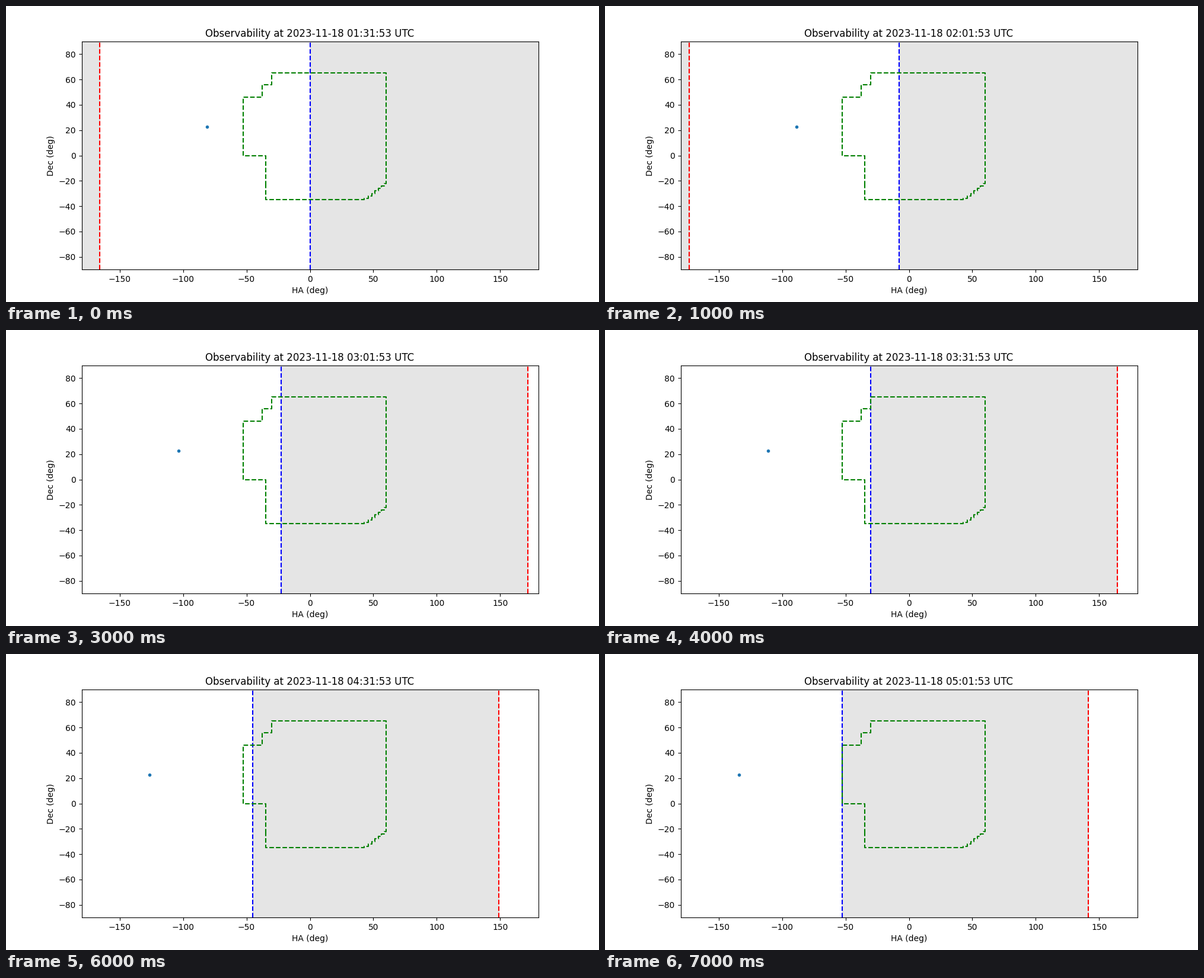
These frames come from a looping animation (1000 px wide and 500 px high, 8000 ms). A matplotlib script:

```python
import matplotlib.pyplot as plt
from matplotlib.animation import FuncAnimation

FRAMES = 8
INTERVAL = 1000
STEP_MINUTES = 30
START_MINUTE = 91               # 01:31 UTC
SIDEREAL_STEP = 7.5205          # degrees of hour angle per step

BLUE_HA, RED_HA = 0.02, -165.77
TARGET_HA, TARGET_DEC = -81.13, 22.6
SOUTH, NORTH = -35, 65
EAST, WEST = -35, 60
CORNER_DEC = -22                # the staircase begins below this declination


def pointing_limits():
    """Outline of the reachable sky, counter-clockwise."""
    stairs = [(WEST, CORNER_DEC)]
    for k in range(7):
        ha = 58.7 - 2.2 * k - 0.075 * k**2
        dec = CORNER_DEC - 2 * k
        stairs += [(ha, dec), (ha, max(dec - 2, SOUTH))]
    northeast = [(-30, NORTH), (-30, 56), (-37.5, 56), (-37.5, 46),
                 (-52.5, 46), (-52.5, 0), (EAST, 0)]
    return [(EAST, CORNER_DEC), (EAST, SOUTH), *stairs[::-1],
            (WEST, NORTH), *northeast, (EAST, CORNER_DEC)]


def wrap(angle):
    return (angle + 180) % 360 - 180


def shade(left, right):
    ax.axvspan(left, right, color="black", alpha=0.1)


def draw(step):
    ax.clear()
    turn = step * SIDEREAL_STEP
    blue, red = wrap(BLUE_HA - turn), wrap(RED_HA - turn)
    if blue < red:
        shade(blue, red)
    else:
        shade(-180, red)
        shade(blue, 180)

    ax.axvline(blue, color="blue", linestyle="--")
    ax.axvline(red, color="red", linestyle="--")
    ax.plot(*zip(*pointing_limits()), color="green", linestyle="--")
    ax.plot(wrap(TARGET_HA - turn), TARGET_DEC, ".", color="C0")

    hour, minute = divmod(START_MINUTE + step * STEP_MINUTES, 60)
    ax.set_title(f"Observability at 2023-11-18 {hour:02d}:{minute:02d}:53 UTC")
    ax.set_xlabel("HA (deg)")
    ax.set_ylabel("Dec (deg)")
    ax.set_xlim(-180, 180)
    ax.set_ylim(-90, 90)
    ax.set_aspect("equal")
    return []


fig, ax = plt.subplots(figsize=(10, 5), dpi=100)
anim = FuncAnimation(fig, draw, frames=FRAMES, interval=INTERVAL,
                     init_func=lambda: draw(0), repeat=True, repeat_delay=0)
plt.show()
```
